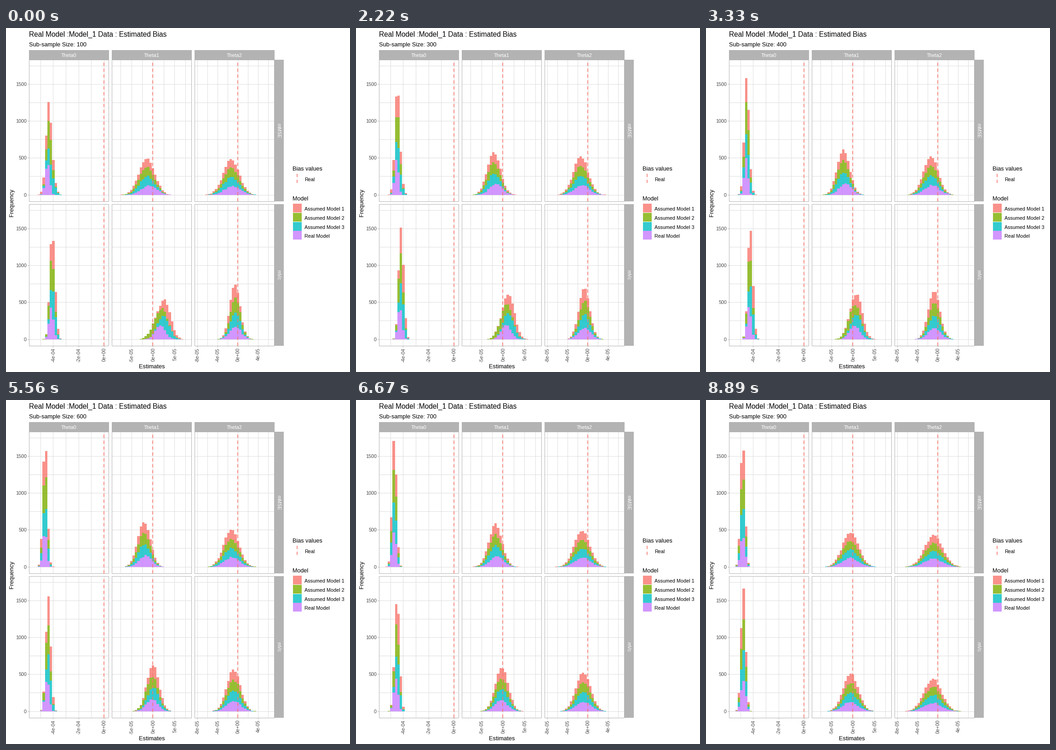
Write a matplotlib script that moves like this. It is 748x748 px and loops after 10000 ms.

```python
import math

import matplotlib.pyplot as plt
import numpy as np
from matplotlib.animation import FuncAnimation
from matplotlib.patches import Rectangle

plt.rcParams["font.family"] = "Liberation Sans"

SIDE, DPI = 748, 100
LOOP, FRAMES, STEPS = 10000, 100, 9
PX = 72 / DPI                       # one pixel in points
LEFT, TOP = (50.5, 230.3, 409.9), (69, 383)
WIDE, HIGH = 173, 307.5
BIN, BINS = WIDE / 33, 30
UNIT = 80.27 / 500                  # pixels per count
GREY, GRID, INK = "#b3b3b3", "#dedede", "#4d4d4d"
RED = "#f8766d"
COLORS = ("#c77cff", "#00bfc4", "#7cae00", RED)   # bottom of the stack first

fig = plt.figure(figsize=(SIDE / DPI, SIDE / DPI), dpi=DPI, facecolor="white")
ax = fig.add_axes([0, 0, 1, 1])
ax.set(xlim=(0, SIDE), ylim=(SIDE, 0))
ax.axis("off")


def line(x, y, color, z, width=1.0, **kw):
    ax.plot(x, y, color=color, lw=width * PX, zorder=z,
            solid_capstyle="butt", dash_capstyle="butt", **kw)


def dashed(x, y0, y1):
    line([x, x], [y0, y1], RED, 4, 1.6, ls=(0, (4.5, 3.5)))


def box(x, y, w, h, z=5, **kw):
    ax.add_patch(Rectangle((x, y), w, h, zorder=z, **kw))


def text(x, y, s, size=10.7, color="black", **kw):
    return ax.text(x, y, s, fontsize=size * PX, color=color, zorder=6, **kw)


def bend(t, start, end, sag):
    """Straight run from start to end, bowed by a parabola."""
    return start + (end - start) * t + sag * t * (1 - t)


def bin_counts(mean, sd):
    """Expected counts of 1000 normal draws in unit bins centred on 0, 1, 2..."""
    cdf = [0.5 * (1 + math.erf((k - 0.5 - mean) / (sd * math.sqrt(2))))
           for k in range(BINS + 1)]
    return 1000 * np.diff(cdf)


class Panel:
    """Stacked histogram of four models, measured in bins.

    The real model's mean follows `path`; the others start off it by `shifts`
    and close in with power `fade`. Spreads run from `spreads` to `end`.
    """

    def __init__(self, col, row, path, shifts, fade, spreads, end, sag,
                 jitter=0.4):
        self.path, self.fade, self.end, self.sag = path, fade, end, sag
        self.models = list(zip((0, *shifts), spreads))
        self.jitter, self.seed = jitter, 10 * row + col
        self.base = round(TOP[row] + HIGH * 21 / 22)
        start = LEFT[col] + 1.5 * BIN
        self.edges = np.round(start + BIN * np.arange(BINS + 1))
        flat = np.full(BINS, float(self.base))
        self.layers = [ax.stairs(flat, self.edges, baseline=flat, fill=True,
                                 color=c, alpha=0.8, lw=0, zorder=3,
                                 antialiased=False) for c in COLORS]

    def show(self, step):
        t = step / (STEPS - 1)
        rng = np.random.default_rng(100 * self.seed + step)
        total, low = np.zeros(BINS), np.full(BINS, float(self.base))
        for layer, (shift, spread) in zip(self.layers, self.models):
            mean = bend(t, *self.path) + shift * (1 - t) ** self.fade
            n = bin_counts(mean, bend(t, spread, self.end, self.sag))
            noise = self.jitter * np.sqrt(n) * rng.standard_normal(BINS)
            total = total + np.maximum(n + noise, 0)
            high = np.round(self.base - total * UNIT)
            layer.set_data(high, self.edges, low)
            low = high


# zero position, major step in pixels, labelled steps
AXES = (
    (212.9, 55.3, ((-2, "-4e-04"), (-1, "-2e-04"), (0, "0e+00"))),
    (319.5, 46.7, ((-1, "-5e-05"), (0, "0e+00"), (1, "5e-05"))),
    (504.0, 44.2, ((-2, "-8e-05"), (-1, "-4e-05"), (0, "0e+00"), (1, "4e-05"))),
)


def frame_panel(col, row):
    x0, y0 = LEFT[col], TOP[row]
    x1, y1 = x0 + WIDE, y0 + HIGH
    base = y0 + HIGH * 21 / 22
    for i in range(8):
        y = base - 250 * i * UNIT
        line([x0, x1], [y, y], GRID, 1)
        if col == 0 and i % 2 == 0:
            line([x0 - 3, x0], [y, y], GREY, 2)
            text(45, y + 4, 250 * i, color=INK, ha="right")
    zero, step, ticks = AXES[col]
    for i in range(-8, 5):
        x = zero + i * step / 2
        if x0 < x < x1:
            line([x, x], [y0, y1], GRID, 1)
    if row == 1:
        for i, label in ticks:
            x = zero + i * step
            line([x, x], [y1, y1 + 3], GREY, 2)
            text(x + 1, 695.5, label, color=INK, rotation=90,
                 ha="center", va="top")
    dashed(zero, y1, y0)
    box(x0, y0, WIDE, HIGH, fill=False, ec=GREY, lw=PX)


for c in range(3):
    for r in range(2):
        frame_panel(c, r)
    box(round(LEFT[c]), 48, WIDE + 1, 21, fc=GREY, lw=0)
    text(LEFT[c] + WIDE / 2, 63, f"Theta{c}", color="white", ha="center")
for y0, name in zip(TOP, ("mMSE", "mVc")):
    box(583, y0, 21, HIGH + 0.5, fc=GREY, lw=0)
    text(592, y0 + HIGH / 2, name, color="white", rotation=-90,
         ha="center", va="center")

text(50, 19, "Real Model :Model_1 Data : Estimated Bias", 15.5)
subtitle = text(50, 40, "", 12.8)
text(317, 740, "Estimates", 12.9, ha="center")
text(13.5, 380, "Frequency", 12.8, rotation=90, ha="center", va="center")

text(623.5, 310, "Bias values", 12.6)
dashed(633, 337, 317)
text(649, 333, "Real")
text(623.5, 375, "Model", 12.6)
names = ("Assumed Model 1", "Assumed Model 2", "Assumed Model 3", "Real Model")
for i, (name, c) in enumerate(zip(names, COLORS[::-1])):
    y = 382 + 19.8 * i
    box(624, round(y), 19, 19, fc=c, alpha=0.8, lw=0)
    text(649, y + 15, name)

panels = [
    Panel(0, 0, path=(5.6, 3.6, 0.6), shifts=(1.35, 0.8, 0.65), fade=2,
          spreads=(0.85, 1.4, 0.95, 1.5), end=0.87, sag=-0.5, jitter=0.1),
    Panel(0, 1, path=(7.1, 3.85, 1.5), shifts=(0.9, 0.15, 1), fade=0.05,
          spreads=(0.88, 1, 0.92, 1), end=0.9, sag=-0.2, jitter=0.1),
    Panel(1, 0, path=(13.6, 14, -8), shifts=(-1.8, -1.5, -1.2), fade=0.6,
          spreads=(3.2, 3, 3.1, 3.5), end=3.4, sag=-3.2),
    Panel(1, 1, path=(18, 14.1, -4), shifts=(2.5, -1.6, 3.2), fade=1.1,
          spreads=(2.1, 2.1, 2.6, 2.1), end=3.1, sag=-1.4),
    Panel(2, 0, path=(13.8, 14.2, -2), shifts=(-1, -0.7, -0.7), fade=0.8,
          spreads=(3.3, 3.2, 3.2, 3.4), end=3.75, sag=-2),
    Panel(2, 1, path=(15, 13.9, -0.2), shifts=(0, -0.1, -0.7), fade=1,
          spreads=(2.4, 2, 1.9, 2), end=3.6, sag=-1),
]


def update(i):
    step = min(i * STEPS // (FRAMES - 1), STEPS - 1)
    subtitle.set_text(f"Sub-sample Size: {100 * (step + 1)}")
    for p in panels:
        p.show(step)


anim = FuncAnimation(fig, update, frames=FRAMES, interval=LOOP // FRAMES,
                     repeat=True, repeat_delay=0)
plt.show()
```
